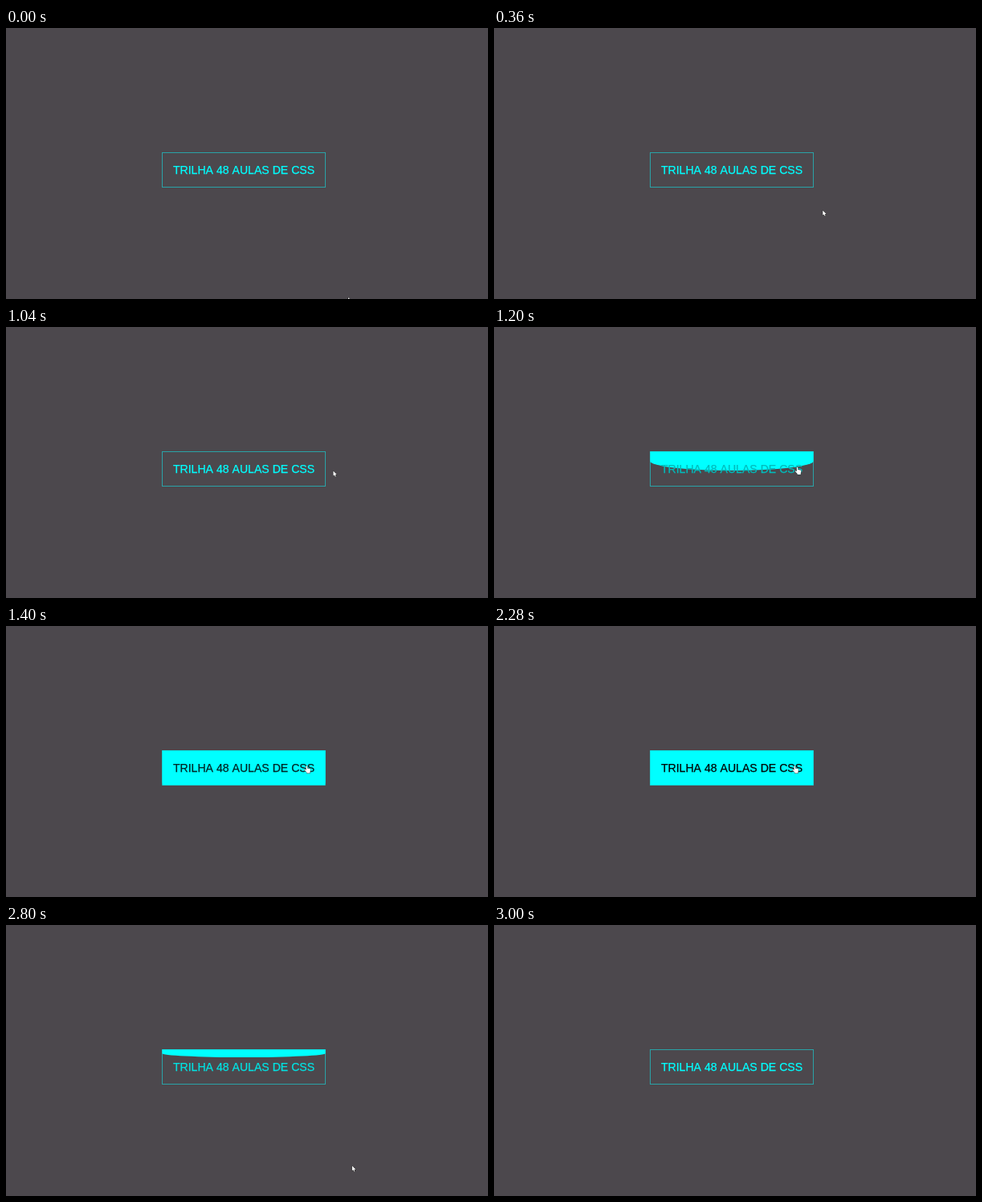
These frames come from a looping animation (600x338 px, 3040 ms). An HTML page with a canvas:

```html
<!DOCTYPE html>
<html lang="pt">
<head>
<meta charset="utf-8">
<title>Botão</title>
<style>
html, body { margin: 0; width: 100%; height: 100%; overflow: hidden; background: #4c484d; }
canvas { display: block; }
</style>
</head>
<body>
<canvas id="stage" width="600" height="338"></canvas>
<script>
const ctx = document.getElementById('stage').getContext('2d');
const LOOP = 3040, STEP = 40, FADE = 500;
const ENTER = 1105, LEAVE = 2500;
const BOX = { x: 194, y: 155, w: 204, h: 44 };
const LABEL = 'TRILHA 48 AULAS DE CSS';

// Places where the pointer starts, waits, hovers and leaves
const START = { x: 426, y: 336 };
const BESIDE = { x: 417, y: 181 };
const OVER = { x: 372, y: 174 };
const GONE = { x: 410, y: 340 };

const clamp = v => Math.max(0, Math.min(1, v));
const mix = (a, b, p) => a + (b - a) * p;
const progress = (t, from, to) => clamp((t - from) / (to - from));

// CSS "ease": cubic-bezier(.25, .1, .25, 1)
function ease(x) {
  if (x <= 0 || x >= 1) return clamp(x);
  const bezier = (a, b, s) => 3 * a * s * (1 - s) ** 2 + 3 * b * s * s * (1 - s) + s ** 3;
  let lo = 0, hi = 1;
  for (let i = 0; i < 20; i++) {
    const mid = (lo + hi) / 2;
    if (bezier(0.25, 0.25, mid) < x) lo = mid; else hi = mid;
  }
  return bezier(0.1, 1, lo);
}

// Move between two places with separate progress per axis and a sideways bow
const arc = (a, b, px, py, bow) => ({
  x: mix(a.x, b.x, px) + bow * Math.sin(Math.PI * px),
  y: mix(a.y, b.y, py)
});

function pointerAt(t) {
  if (t < 680) {
    const p = progress(t, 0, 680);
    return arc(START, BESIDE, p, 1 - (1 - p) ** 1.6, -12);
  }
  if (t < 2280) {
    const p = progress(t, 680, 1210) ** 4;
    return arc(BESIDE, OVER, p, p, 0);
  }
  const p = progress(t, 2280, 2860);
  return arc(OVER, GONE, p ** 2, p ** 2.5, 49);
}

const ARROW = new Path2D('M0 0V6.2L1.4 5L2.4 7.2L3.4 6.8L2.5 4.6H4.4Z');
const HAND = new Path2D('M1.6 .7Q2.4 -.2 3 .7V3.4L6 4Q7.2 4.4 7 5.6L6.4 8.2V9.6H2.4V8.6L-.4 5.6Q-.4 4.6 .6 4.9L1.6 5.8Z');

function drawPointer(t) {
  const { x, y } = pointerAt(t);
  const hover = t >= ENTER && t < LEAVE;
  const shape = hover ? HAND : ARROW;
  ctx.save();
  ctx.translate(x, y);
  ctx.lineJoin = 'round';
  ctx.lineWidth = 1;
  ctx.strokeStyle = hover ? '#244' : '#222';
  ctx.stroke(shape);
  ctx.fillStyle = '#fff';
  ctx.fill(shape);
  ctx.restore();
}

function drawFill(amount) {
  if (amount <= 0) return;
  const { x, y, w, h } = BOX;
  const half = h * amount;
  ctx.save();
  ctx.beginPath();
  ctx.rect(x + 0.4, y + 0.2, w - 0.8, h - 0.6);
  ctx.clip();
  ctx.beginPath();
  ctx.moveTo(x, y);
  ctx.lineTo(x + w, y);
  ctx.ellipse(x + w / 2, y + half, w / 2, half, 0, 0, Math.PI);
  ctx.closePath();
  ctx.fillStyle = '#0ff';
  ctx.fill();
  ctx.restore();
}

function drawLabel(amount) {
  const tone = Math.round(255 - 247 * amount);
  ctx.fillStyle = ctx.strokeStyle = `rgb(0,${tone},${tone})`;
  ctx.font = '14.1px "Liberation Sans", Arial, sans-serif';
  ctx.textAlign = 'center';
  ctx.lineWidth = 0.25;
  ctx.fillText(LABEL, BOX.x + BOX.w / 2, 181.5);
  ctx.strokeText(LABEL, BOX.x + BOX.w / 2, 181.5);
}

function draw(t) {
  const amount = ease((t - ENTER) / FADE) - ease((t - LEAVE) / FADE);
  ctx.fillStyle = '#4c484d';
  ctx.fillRect(0, 0, 600, 338);
  ctx.lineWidth = 1;
  ctx.strokeStyle = '#2aa3a7';
  ctx.strokeRect(BOX.x + 0.5, BOX.y + 0.5, BOX.w - 1, BOX.h - 1);
  drawFill(amount);
  drawLabel(amount);
  drawPointer(t);
}

function tick() {
  const t = performance.now() % LOOP;
  draw(Math.floor(t / STEP) * STEP);
  requestAnimationFrame(tick);
}
tick();
</script>
</body>
</html>
```
